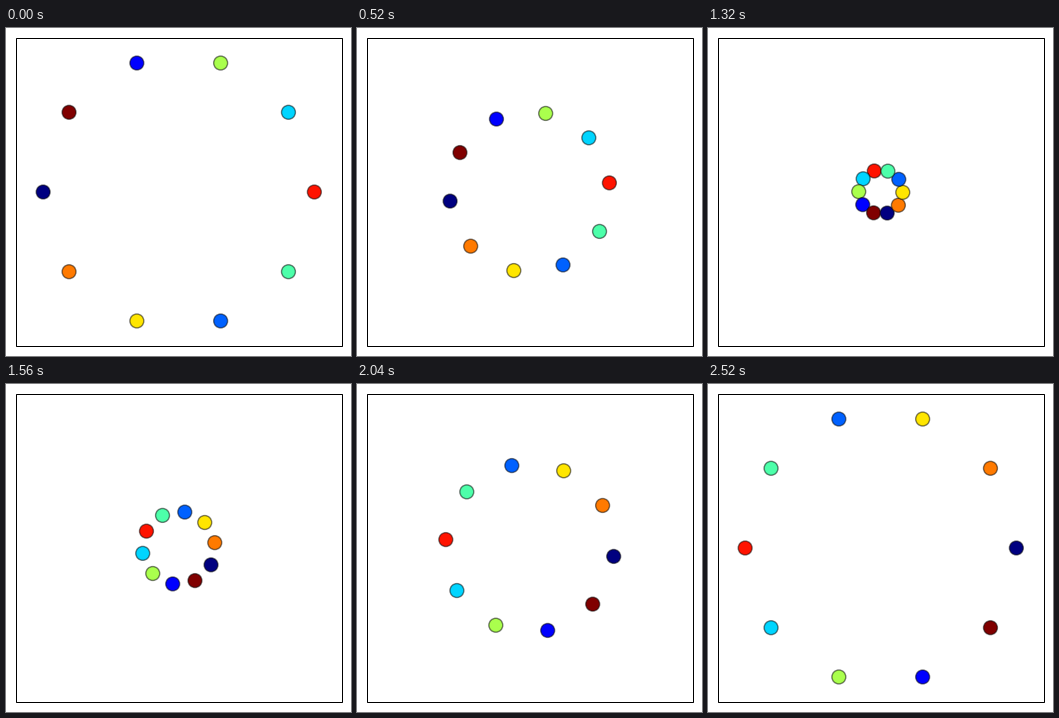
Write a matplotlib script that moves like this. It is 345 px wide and 328 px high and loops after 2560 ms.

```python
import numpy as np
import matplotlib.pyplot as plt
from matplotlib.animation import FuncAnimation
from matplotlib.patches import Rectangle

W, H, DPI = 345, 328, 100
FRAMES, INTERVAL = 64, 40
CENTER = np.array([172.75, 164.0])
RADIUS = 135.6   # starting circle
BULGE = 22.1     # sideways offset at the halfway point

PX = 72 / DPI    # one pixel in points

fig = plt.figure(figsize=(W / DPI, H / DPI), dpi=DPI, facecolor="white")
ax = fig.add_axes([0, 0, 1, 1])
ax.set_xlim(0, W)
ax.set_ylim(0, H)
ax.axis("off")
ax.add_patch(Rectangle((10, 10), 326, 308, fill=False, ec="black", lw=PX))

order = [8, 3, 5, 1, 9, 0, 7, 6, 2, 4]
faces = plt.get_cmap("jet")(np.array(order) / 9)
start = np.arange(10) * 2 * np.pi / 10


def positions(i):
    """Each dot crosses to the opposite side, swerving to its right."""
    t = i / (FRAMES - 1)
    along = RADIUS * (1 - 2 * t)
    aside = BULGE * (1 - abs(1 - 2 * t))
    c, s = np.cos(start), np.sin(start)
    return CENTER + np.column_stack([along * c - aside * s,
                                     along * s + aside * c])


dots = ax.scatter(*positions(0).T, s=100, c=faces,
                  edgecolors=(0, 0, 0, 0.5), linewidths=1.0)


def update(i):
    dots.set_offsets(positions(i))
    return [dots]


anim = FuncAnimation(fig, update, frames=FRAMES, interval=INTERVAL,
                     repeat=True, repeat_delay=0)
plt.show()
```
